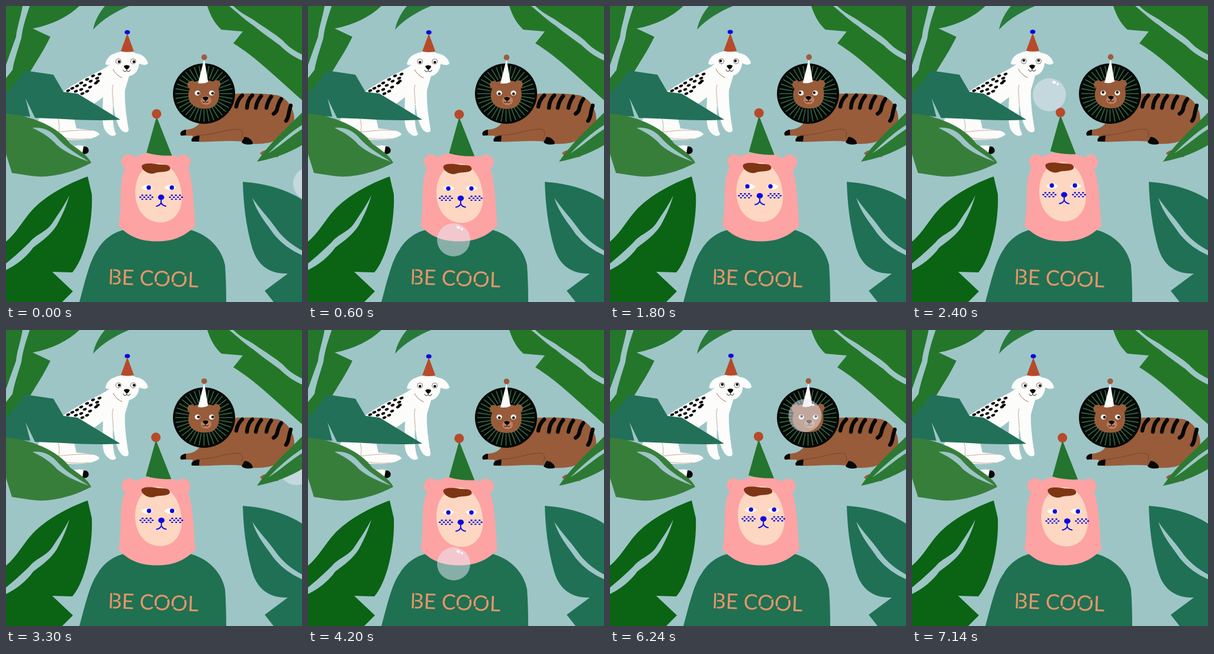
Write an HTML page with a canvas that moves like this. It is 500 px wide and 500 px high and loops after 7170 ms.

```html
<!DOCTYPE html>
<html lang="en">
<head>
<meta charset="utf-8">
<title>Be cool</title>
<style>
html, body { margin: 0; width: 100%; height: 100%; overflow: hidden; background: #9dc5c6; }
canvas { display: block; width: 500px; height: 500px; }
</style>
</head>
<body>
<canvas id="stage" width="500" height="500"></canvas>
<script>
const ctx = document.getElementById('stage').getContext('2d');
const LOOP = 7170, ORBIT = 3600, FRAME = 30;
const BG = '#9dc5c6', BLUE = '#0a0ae0', PINK = '#fda3a3', TEAL = '#207052', BROWN = '#985c3a', RUST = '#b64a2a';

const fill = (color, d) => { ctx.fillStyle = color; ctx.fill(new Path2D(d)); };
const line = (color, width, d) => {
  ctx.strokeStyle = color;
  ctx.lineWidth = width;
  ctx.lineCap = ctx.lineJoin = 'round';
  ctx.stroke(new Path2D(d));
};
const oval = (color, x, y, rx, ry = rx, turn = 0) => {
  ctx.fillStyle = color;
  ctx.beginPath();
  ctx.ellipse(x, y, rx, ry, turn, 0, 2 * Math.PI);
  ctx.fill();
};
const shifted = (x, y, draw) => { ctx.save(); ctx.translate(x, y); draw(); ctx.restore(); };

// Bubble path: half an orbit as [time, x, y]; the other half is its point reflection.
const half = [[0, 513, 300], [390, 330, 367], [600, 246, 395], [720, 189, 402],
  [1080, 78, 391], [1230, 54, 369], [1500, -12, 311], [1680, -60, 272]];
const orbit = half.concat(half.map(([t, x, y]) => [t + ORBIT / 2, 478 - x, 545 - y]));

function knot(i) {
  const n = orbit.length, turn = Math.floor(i / n);
  const [t, x, y] = orbit[i - turn * n];
  return [t + turn * ORBIT, x, y];
}

function bubbleAt(t) {
  let i = orbit.length - 1;
  while (orbit[i][0] > t) i--;
  const [p, a, b, q] = [i - 1, i, i + 1, i + 2].map(knot);
  const d = b[0] - a[0], s = (t - a[0]) / d;
  return [1, 2].map(k => {
    const m = (b[k] - p[k]) / (b[0] - p[0]) * d, n = (q[k] - a[k]) / (q[0] - a[0]) * d;
    return a[k] + s * (m + s * (3 * (b[k] - a[k]) - 2 * m - n + s * (2 * (a[k] - b[k]) + m + n)));
  });
}

function dog(u, v) {
  const white = '#fcfcfb', crease = '#c9a898';
  fill(white, 'M180 92C176 104 150 112 123 128C90 146 62 170 53 197C54 212 78 222 92 225C118 227 145 228 158 217C156 210 140 209 119 207L115 190L164 154C163 180 162 200 167 209C173 220 184 222 186 216C180 206 180 185 181 160C183 185 188 202 195 210C202 216 208 213 207 208C203 185 200 160 201 142L209 115Z');
  fill(white, 'M110 238C120 234 132 235 139 239C141 246 137 251 130 250Z');
  fill('#080808', 'M131 237C139 237 141 242 139 247C136 251 130 251 129 249Z');
  line(crease, 1, 'M88 191C91 200 90 207 89 213C105 211 125 209 145 210M181 133C178 143 181 150 181 164M92 221C105 225 125 226 140 224');
  for (const [x, y] of [[158, 115], [147, 118], [137, 124], [127, 130], [154, 122], [143, 127], [133, 134],
    [120, 135], [152, 130], [142, 137], [127, 141], [112, 139], [155, 127], [137, 144], [118, 144], [105, 143], [129, 148]])
    oval('#080808', x, y, 3.5, 2.1, -.4);
  shifted(u, v * .4, () => {
    fill(white, 'M183 80C192 75 211 75 219 80C228 80 238 89 239 97C234 101 229 99 224 97C223 111 214 119 203 118C192 119 181 108 180 96C175 100 169 100 167 98C168 90 174 82 183 80Z');
    line('#987058', 1, 'M180 107C183 113 188 118 195 121');
    fill(RUST, 'M204 46L193 76Q204 79 215 76Z');
    oval(BLUE, 204, 44, 4.5, 3.5);
    for (const x of [189, 214]) {
      oval('#57483c', x, 93.500, 4.7);
      oval('#fff', x, 93.500, 3.9);
      oval('#080808', x + u * 1.3, 93.500 + v * 1.1, 2.3);
    }
    fill('#080808', 'M198 101Q203 98 208 101Q207 106 203 107Q199 105 198 101Z');
    line('#222', 1, 'M203 106V109Q199 113 197 108M203 109Q207 113 209 108');
  });
}

function lion(u, v) {
  const black = '#060806';
  fill(BROWN, 'M429 249Q434 241 460 242V255Q435 256 429 249Z');
  fill(BROWN, 'M375 149C405 147 438 147 460 151C479 158 488 178 487 194C483 215 463 226 444 231C430 233 415 235 400 229C370 226 340 231 316 229L315 219L295 219Q293 212 301 209C315 209 325 204 330 192Z');
  fill(black, 'M304 209C296 210 292 215 296 219L304 218Z');
  fill(black, 'M327 219C317 219 311 224 314 229L326 229Z');
  fill(black, 'M403 221C412 222 417 228 417 233C410 235 401 234 398 230Z');
  line('#77452c', 1, 'M322 218C350 220 380 204 397 209Q402 214 398 222');
  shifted(-3, 0, () => {
    for (const d of ['M402 151Q394 158 392 170', 'M419 151Q411 158 410 172', 'M434 152Q427 160 425 172',
      'M451 153Q445 161 443 172', 'M468 157Q463 164 461 174Q460 179 455 182', 'M484 168Q481 178 480 185Q478 192 476 194'])
      line(black, 6.5, d);
  });
  const rays = 36;
  oval(black, 334.500, 148, 52.500, 51);
  for (let i = 0; i < rays; i++) {
    const a = i / rays * 2 * Math.PI, c = Math.cos(a), s = Math.sin(a);
    line('#326c49', 1.6, `M${334.5 + 27 * c} ${148 + 27 * s}L${334.5 + 48 * c} ${148 + 47 * s}`);
  }
  shifted(-u * .7, v * .4, () => {
    oval(BROWN, 314, 133, 7);
    oval(BROWN, 356, 132, 7);
    fill(BROWN, 'M313 131C324 123 347 123 357 131C365 149 361 171 342 173C322 176 306 165 309 146Z');
    fill('#fcfcfb', 'M335.500 89L325 130Q334 132 342 128Z');
    oval('#9d5c3e', 335.500, 86.500, 4.8);
  });
  for (const x of [323, 347]) {
    oval('#fff', x + u * .5, 147, 4.6, 4.2);
    oval(black, x + u * 2.2, 147 + v * 1.2, 2.3);
  }
  shifted(u, v, () => {
    oval('#bd8061', 337, 159, 9, 7.5);
    fill(black, 'M331 154Q336 151 341 154Q340 159 336 159Q332 158 331 154Z');
    line(black, 1, 'M336 158V161Q333 164 331 161M336 161Q339 164 341 161');
  });
}

function slogan() {
  const text = 'BE COOL', size = 36;
  ctx.font = `400 ${size}px Lato, "Open Sans", sans-serif`;
  ctx.fillStyle = '#e3966a';
  ctx.fillText(text, 0, 0);
  // Stencil gaps: a slanted cut through each round letter.
  for (const i of [4, 5]) {
    const left = ctx.measureText(text.slice(0, i)).width;
    const mid = left + ctx.measureText(text[i]).width / 2;
    line(TEAL, 2, `M${mid - 13} -4L${mid + 13} -22`);
  }
  line(TEAL, 2, 'M7.500 -28V2');
}

function person(u, v) {
  fill(TEAL, 'M124 500C133 468 141 430 155 411C165 394 182 381 204 377H306C342 384 365 411 370 438C372 468 372 488 372 500Z');
  shifted(172, 470, () => { ctx.rotate(.035); slogan(); });
  oval(PINK, 209 - 1.4 * u - v, 263, 12.500);
  oval(PINK, 301 - 2.5 * u, 264, 13);
  fill(PINK, 'M190 371C194 348 193 330 194 314C194 290 199 271 211 261C225 248 240 248 255 248C284 248 301 259 309 278C317 305 317 345 320 371C301 391 280 397.500 255 397.500C230 397.500 208 391 190 371Z');

  shifted(.4 * u + 2.3 * v, 1.7 * v, () => {
    fill('#24732e', 'M253 186L236 247Q255 253 279 252Z');
    oval(RUST, 253, 181.500, 8);
  });
  shifted(2.3 * u + .8 * v, 1.2 * v, () => {
    fill('#fdd7c2', 'M254 265C278 265 291 289 294 314C298 343 283 365 259 365C234 365 217 345 216 317C215 290 229 265 254 265Z');
  });
  shifted(2 * u + 1.5 * v, 1.2 * v, () => {
    fill('#7e3514', 'M227 272C225 264 244 265 254 267C264 268 274 266 275 274C274 281 259 279 251 281C242 286 229 279 227 272Z');
  });
  for (const x of [237, 276]) {
    const cx = x + 1.2 * u, cy = 306 + 1.8 * v;
    fill('#fff', `M${cx - 10} ${cy}Q${cx} ${cy - 9} ${cx + 10} ${cy}Q${cx} ${cy + 9} ${cx - 10} ${cy}Z`);
    oval(BLUE, x - .4 + 5 * u, 305.700 + 2.5 * v, 3.7);
  }
  shifted(257.500 + 5 * u, 321.800 + 3 * v, () => {
    oval(BLUE, 0, 0, 5.3, 4.5);
    line(BLUE, 1.9, 'M0 4V9Q-2 14 -8 15M0 9Q2 14 8 15');
    for (const side of [-1, 1])
      [3, 4, 3].forEach((count, row) => {
        for (let i = 0; i < count; i++)
          oval(BLUE, side * (25 + (i - (count - 1) / 2) * 6.8), 3.3 * (row - 1), 1.8, 1.2);
      });
  });
}

function bubble(t) {
  const [x, y] = bubbleAt(t);
  oval('rgba(232,234,246,.52)', x, y, 28);
  oval('#fff', x + 8, y - 21, 3, 2.3, .3);
  oval('#fff', x + 14, y - 18, 1.7, 2, -.5);
}

function leaves() {
  fill('#24762b', 'M0 0H124C105 18 78 32 45 38L75 52C63 77 50 95 38 116L0 150Z');
  fill(BG, 'M28 0C24 22 18 38 17 52C11 68 5 85 0 100V122L11 108C14 90 22 68 26 54C28 36 34 18 40 0Z');
  fill('#297a3a', 'M167 0H208C188 8 163 22 147 40C150 25 157 12 167 0Z');
  fill('#257728', 'M340 0H500V159C462 126 422 86 384 63L400 43L364 40C353 30 346 18 340 0Z');
  fill(BG, 'M384 0C398 14 412 18 426 29C444 41 462 52 472 63C482 73 492 78 500 82V92C488 87 474 78 462 66C446 54 432 45 418 33C404 24 392 12 377 0Z');
  fill('#2c7933', 'M500 180C477 203 444 233 424 263C450 258 477 249 500 235Z');
  fill(BG, 'M500 201C479 214 459 233 443 249C464 236 482 219 500 208Z');
  fill('#227057', 'M0 148C10 138 22 122 32 109L80 116L97 145L121 148L193 192C140 195 95 190 49 189L33 156L41 187L0 184Z');
  fill('#387e3b', 'M0 182C40 184 88 203 109 233C129 246 140 256 144 265C116 280 75 292 43 287L10 282L0 250Z');
  fill(BG, 'M45 206C60 204 75 210 85 221C98 237 120 250 140 263C118 255 100 247 86 235C75 222 60 213 45 206Z');
  fill('#0b6314', 'M138 288C104 300 66 321 44 345C27 364 18 383 0 398V500H95L113 482L78 449L112 450C132 428 147 369 145 318Z');
  fill(BG, 'M107 320C98 338 88 352 78 367C68 382 50 386 40 399C28 411 12 425 0 435V446C18 437 34 425 46 408C62 396 76 386 86 370C95 353 102 338 107 320Z');
  fill('#207055', 'M400 297C442 300 478 312 500 327V500H452L437 481L476 452C445 453 425 438 416 409C405 371 401 333 400 297Z');
  fill(BG, 'M416 324C428 342 443 357 455 374C468 393 484 404 500 413V421C482 413 466 402 452 385C440 367 424 350 416 324Z');
}

function draw(now) {
  const t = Math.floor(now % LOOP / FRAME) * FRAME % ORBIT;
  const angle = 2 * Math.PI * (t + 250) / ORBIT;
  const u = Math.cos(angle), v = Math.sin(angle); // gaze direction
  fill(BG, 'M0 0H500V500H0Z');
  dog(u, v);
  lion(u, v);
  person(u, v);
  bubble(t);
  leaves();
}

const start = performance.now();
function tick() {
  draw(performance.now() - start);
  requestAnimationFrame(tick);
}
tick();
</script>
</body>
</html>
```
